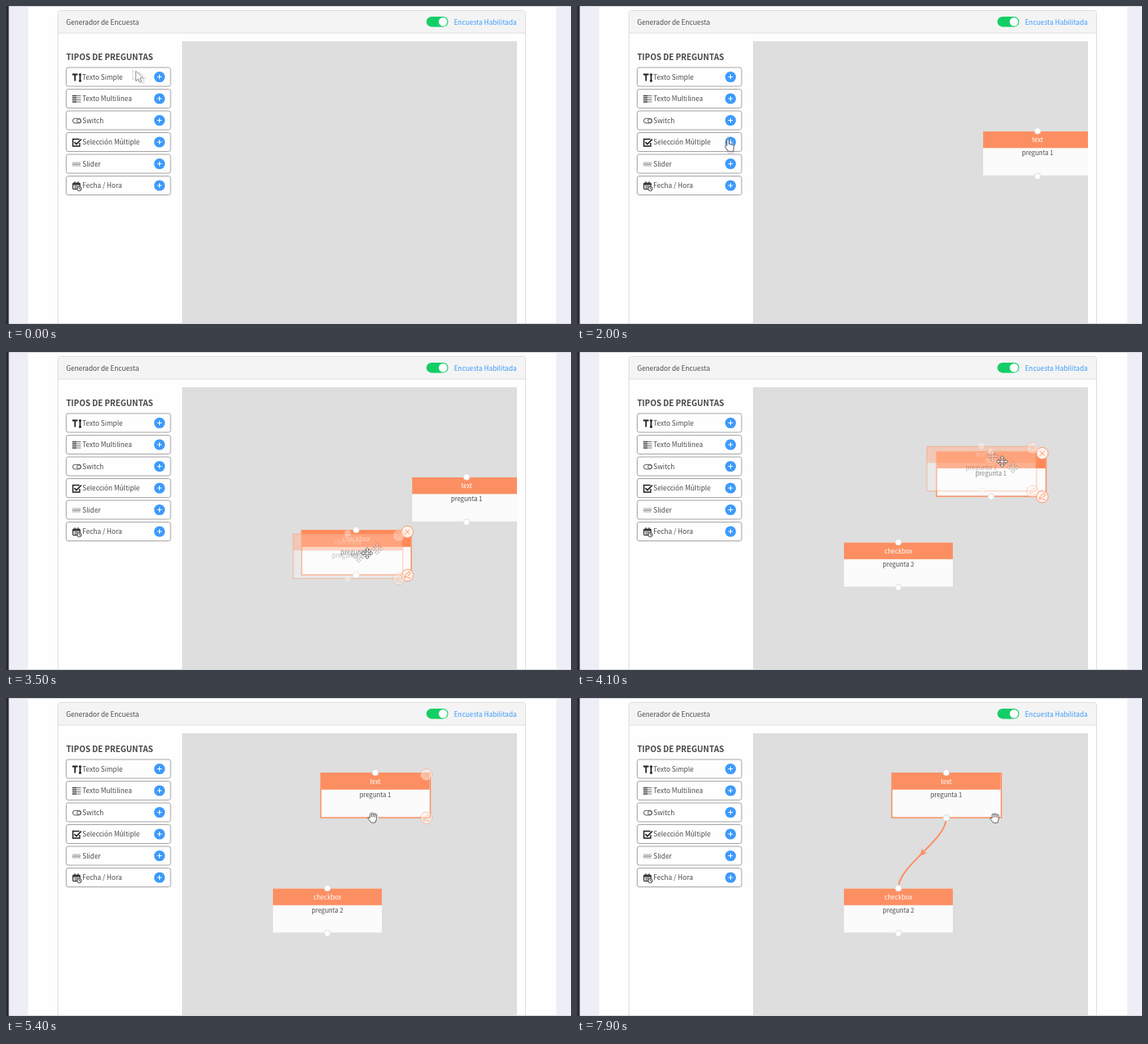
An HTML page with a canvas for the animation above (8 s loop, 690x388 px).

```html
<!DOCTYPE html>
<html lang="es">
<head>
<meta charset="utf-8">
<title>Generador de Encuesta</title>
<style>
html, body { margin: 0; width: 100%; height: 100%; overflow: hidden; background: #fefefe; }
canvas { display: block; width: 690px; height: 388px; }
</style>
</head>
<body>
<canvas id="stage" width="690" height="388"></canvas>
<script>
const ctx = document.getElementById('stage').getContext('2d');
const LOOP = 8000, STEP = 100, LAG = 40;
const FONT = '"Noto Sans CJK JP", "Noto Sans CJK SC", "Noto Sans", sans-serif';
const ORANGE = '#fc8f62', PRESSED = '#ff8957', BLUE = '#3d9afb', INK = '#4a4a4a';
const ROW = 26.5, PLUS_X = 187.5, FIRST_ROW = 86.5;
const NODE_W = 133, NODE_H = 53.7, GRIP = { x: 80, y: 12 };

const point = (x, y) => ({ x, y });
const add = (a, b) => point(a.x + b.x, a.y + b.y);
const mix = (a, b, p) => point(a.x + (b.x - a.x) * p, a.y + (b.y - a.y) * p);
const easeOut = p => 1 - (1 - p) ** 2;
const progress = (t, { from, until }) => easeOut(Math.min(1, Math.max(0, (t - from) / (until - from))));
const between = (t, a, b) => t >= a && t < b;

const checkbox = {
  title: 'checkbox', question: 'pregunta 2', born: 2300, press: 2800,
  home: point(496, 159.8), rest: point(326, 232.5), drag: { from: 3200, until: 3750 },
  grip: point(GRIP.x, 28)
};
const text = {
  title: 'text', question: 'pregunta 1', born: 1200, press: 3900, staysSelected: true,
  home: point(496, 153), rest: point(384.5, 91.5), drag: { from: 3950, until: 4450 },
  grip: GRIP
};
const plus = row => point(PLUS_X - 1.5, FIRST_ROW + 6.5 + ROW * row);
const socket = (node, bottom) => add(node.rest, point(NODE_W / 2, bottom ? 54.8 : -.5));
const LINK = { from: 5800, until: 6450, snap: 6600 };

// Each move eases the pointer from wherever the previous one left it
const ENTRY = point(126, 76);
const MOVES = [
  { from: -300, until: 500, to: plus(0) },
  { from: 1600, until: 2100, to: plus(3) },
  { from: 2530, until: 2913, to: add(checkbox.home, checkbox.grip) },
  { ...checkbox.drag, to: add(checkbox.rest, checkbox.grip) },
  { from: 3750, until: 3900, to: add(text.home, text.grip) },
  { ...text.drag, to: add(text.rest, text.grip) },
  { from: 4900, until: 5500, to: point(447, 147) },
  { ...LINK, to: point(388, 233) },
  { from: 6750, until: 7500, to: point(500, 120) },
  { from: 7500, until: 7750, to: point(510, 146) }
];

const pointer = t => MOVES.reduce((pos, move) => mix(pos, move.to, progress(t, move)), ENTRY);
const nodeAt = (node, t) => mix(node.home, node.rest, progress(t, node.drag));

function isOver(node, t) {
  const p = pointer(t), n = nodeAt(node, t);
  return t >= node.born && between(p.x, n.x, n.x + NODE_W) && between(p.y, n.y - 1, n.y + 53);
}

function cursorKind(t) {
  const { x } = pointer(t);
  if (x < 215) return Math.abs(x - PLUS_X) < 9 ? 'hand' : 'arrow';
  return isOver(text, t) || isOver(checkbox, t) ? 'move' : 'grab';
}

const CURSORS = {
  arrow: 'M-4-7v12l3-2.5l2 4.5l2-1l-2-4.5h4z',
  hand: 'M-3-6q1.5-1.5 2.7 0v5l4.5 1q2 .5 1.5 3l-1 5h-6l-4-6q0-2 2.3-1z',
  move: 'M0-7l2.6 3h-1.6v3h3v-1.6l3 2.6l-3 2.6v-1.6h-3v3h1.6l-2.6 3l-2.6-3h1.6v-3h-3v1.6l-3-2.6l3-2.6v1.6h3v-3h-1.6z',
  grab: 'M-3 .5v-4.5q1-1.5 2 0q.5-2.5 2 0q1.5-1.5 2 .5q1.6-1 2 .5v5l-1.5 4.3h-5l-4-5q0-2 1.5-.8zM-1-4v3.5M1-4v3.5M3-3.5v3.5'
};

function isolated(draw, { x = 0, y = 0, alpha = 1 }) {
  ctx.save();
  ctx.translate(x, y);
  ctx.globalAlpha *= alpha;
  draw();
  ctx.restore();
}

function rect(x, y, w, h, fill) {
  ctx.fillStyle = fill;
  ctx.fillRect(x, y, w, h);
}

function paint(fill, stroke, width = 1) {
  if (fill) { ctx.fillStyle = fill; ctx.fill(); }
  if (stroke) { ctx.strokeStyle = stroke; ctx.lineWidth = width; ctx.stroke(); }
}

function rounded(x, y, w, h, r, fill, stroke, width) {
  ctx.beginPath();
  ctx.roundRect(x, y, w, h, r);
  paint(fill, stroke, width);
}

function circle(x, y, r, fill, stroke, width) {
  ctx.beginPath();
  ctx.arc(x, y, r, 0, 2 * Math.PI);
  paint(fill, stroke, width);
}

function line(d, color, width = 1) {
  ctx.strokeStyle = color;
  ctx.lineWidth = width;
  ctx.stroke(new Path2D(d));
}

function label(string, x, y, size, color, align = 'left', weight = 400) {
  ctx.font = `${weight} ${size}px ${FONT}`;
  ctx.textAlign = align;
  ctx.fillStyle = color;
  ctx.fillText(string, x, y);
}

// Icons are drawn around the left centre of each button
const BUTTONS = [
  ['Texto Simple', () => line('M0-3h6.6M3.3-3v8M8-3h3M9.5-3v8M8 5h3', '#222', 1.8)],
  ['Texto Multilinea', () => {
    for (let y = -3.5; y < 5; y += 2.5) {
      rect(0, y - .7, 5, 1.5, '#444');
      rect(5, y - .5, 5.5, 1, '#777');
    }
  }],
  ['Switch', () => {
    rounded(.5, -2.2, 10.2, 5.6, 2.8, null, '#555', 1);
    circle(8, .6, 2.3, '#fff', '#555', 1);
  }],
  ['Selección Múltiple', () => {
    line('M9 1v4h-8.3v-8.5h8', '#222', 1.4);
    line('M2.5 0l2.5 2.5l6-6', '#222', 1.7);
  }],
  ['Slider', () => {
    for (let x = 1; x < 11; x += 2) {
      line(`M${x}-2.5v6`, '#999', .8);
      line(`M${x - 1} 1.5l2-2`, '#888', .9);
    }
  }],
  ['Fecha / Hora', () => {
    rounded(.7, -3, 8.6, 7.5, 1, '#fff', '#333', 1.2);
    rect(.7, -3, 8.6, 2.5, '#333');
    line('M3-5v3M7-5v3M2.5 1h5M2.5 3h3', '#333', 1);
    circle(8.5, 4, 2.6, '#fff', '#333', 1);
    line('M8.5 2.5v1.7h1.3', '#333', .8);
  }]
];

function drawPage() {
  rect(0, 0, 690, 388, '#eeeef7');
  rect(27, 0, 645, 388, '#fefefe');
  rounded(63.5, 5.5, 571, 400, 3, '#fefefe', '#dedede');
  rounded(64, 6, 570, 27, [3, 3, 0, 0], '#f4f4f4');
  rect(64, 32.5, 570, 1, '#dfdfdf');
  rect(215, 43, 409, 345, '#dedede');
  label('Generador de Encuesta', 73.5, 22.6, 8.23, INK);
  rounded(513.5, 13, 26.5, 12.4, 6.2, '#13ce66');
  circle(533.7, 19.2, 5.2, '#fff');
  label('Encuesta Habilitada', 547, 22.6, 8.25, BLUE);
  label('TIPOS DE PREGUNTAS', 73.5, 66, 9.8, '#444', 'left', 600);
  BUTTONS.forEach(([name, icon], i) => {
    const y = FIRST_ROW + i * ROW;
    rounded(73.5, y - 11.5, 127.5, 23, 2.5, '#fefefe', '#a6a6a6');
    isolated(icon, { x: 81, y });
    label(name, 93.3, y + 3.4, 8.23, INK);
    circle(PLUS_X, y, 6.6, BLUE);
    line(`M${PLUS_X - 2.8} ${y}h5.6M${PLUS_X} ${y - 2.8}v5.6`, '#fff', 1);
  });
  rect(0, 0, 690, 1, '#d9d9dd');
  rect(0, 387, 690, 1, '#d9d9dd');
  rect(0, 0, 3.4, 388, '#2a2d35');
}

function drawHandle({ x, y }) {
  circle(x, y, 3.8, '#fff', '#d5d5d5', .8);
}

function drawActions() {
  for (const y of [2, 55]) circle(0, y, 7.2, '#fff3ed', ORANGE, .9);
  line('M-3-1l6 6m0-6l-6 6', ORANGE, 1);
  line('M-3.5 58l1-3l4.5-4.5l2 2l-4.5 4.5zm4 .3h3.5', ORANGE, 1);
}

function drawNode(node, t, place = t) {
  const { x, y } = nodeAt(node, place);
  const pressed = between(t, node.press, node.drag.until);
  const selected = t >= node.drag.from && (pressed || node.staysSelected);
  const hover = (isOver(node, t) + isOver(node, t - STEP)) / 2;
  rect(x, y, NODE_W, NODE_H, '#fbfbfb');
  rect(x, y, NODE_W, 20.3, pressed ? PRESSED : ORANGE);
  if (selected) {
    ctx.strokeStyle = ORANGE;
    ctx.lineWidth = 1.4;
    ctx.strokeRect(x, y + .2, NODE_W + .8, NODE_H + .6);
  }
  const middle = x + NODE_W / 2;
  label(node.title, middle, y + 13.2, 7.65, '#fff', 'center');
  label(node.question, middle, y + 29.3, 7.65, INK, 'center');
  drawHandle(point(middle, y - .5));
  drawHandle(point(middle, y + 54.8));
  isolated(drawActions, { x: x + 129, y, alpha: hover });
}

function drawNodeWithTrail(node, t) {
  if (t < node.born) return;
  isolated(() => drawNode(node, t), { alpha: t < node.born + STEP ? .85 : 1 });
  if (between(t, node.drag.from, node.drag.until))
    isolated(() => drawNode(node, t, t + LAG), { alpha: .35 });
}

function drawLink(t) {
  const a = socket(text, true);
  const b = t < LINK.snap ? pointer(t) : socket(checkbox, false);
  const dx = b.x - a.x, dy = b.y - a.y, bend = dy * .32;
  line(`M${a.x} ${a.y}C${a.x} ${a.y + bend} ${b.x} ${b.y - bend} ${b.x} ${b.y}`, ORANGE, 1.9);
  if (dy > 15) isolated(() => {
    ctx.rotate(Math.atan2(dy - bend, dx));
    ctx.fillStyle = ORANGE;
    ctx.fill(new Path2D('M5 0L-4 4L-2 0L-4-4z'));
  }, mix(a, b, .5));
  drawHandle(a);
  drawHandle(socket(checkbox, false));
}

function drawCursor(t, alpha) {
  const kind = cursorKind(t), shape = new Path2D(CURSORS[kind]);
  isolated(() => {
    ctx.lineJoin = 'round';
    ctx.fillStyle = '#fff';
    ctx.fill(shape);
    ctx.strokeStyle = kind === 'arrow' ? '#777' : '#444';
    ctx.lineWidth = .9;
    ctx.stroke(shape);
  }, { ...pointer(t), alpha });
}

// A fast pointer leaves a faint copy just before and after its place
function drawPointer(t) {
  const here = pointer(t);
  for (const time of [t - LAG, t + LAG]) {
    const there = pointer(time);
    if (Math.hypot(there.x - here.x, there.y - here.y) > 1) drawCursor(time, .3);
  }
  drawCursor(t, .85);
}

function drawScene(t) {
  drawPage();
  ctx.save();
  ctx.beginPath();
  ctx.rect(215, 43, 409, 345);
  ctx.clip();
  const stack = t < text.press ? [text, checkbox] : [checkbox, text];
  for (const node of stack) drawNodeWithTrail(node, t);
  if (t >= LINK.from) drawLink(t);
  ctx.restore();
  drawPointer(t);
}

const start = performance.now();
function tick() {
  const elapsed = (performance.now() - start) % LOOP;
  drawScene(Math.floor(elapsed / STEP) * STEP);
  requestAnimationFrame(tick);
}
tick();
</script>
</body>
</html>
```
